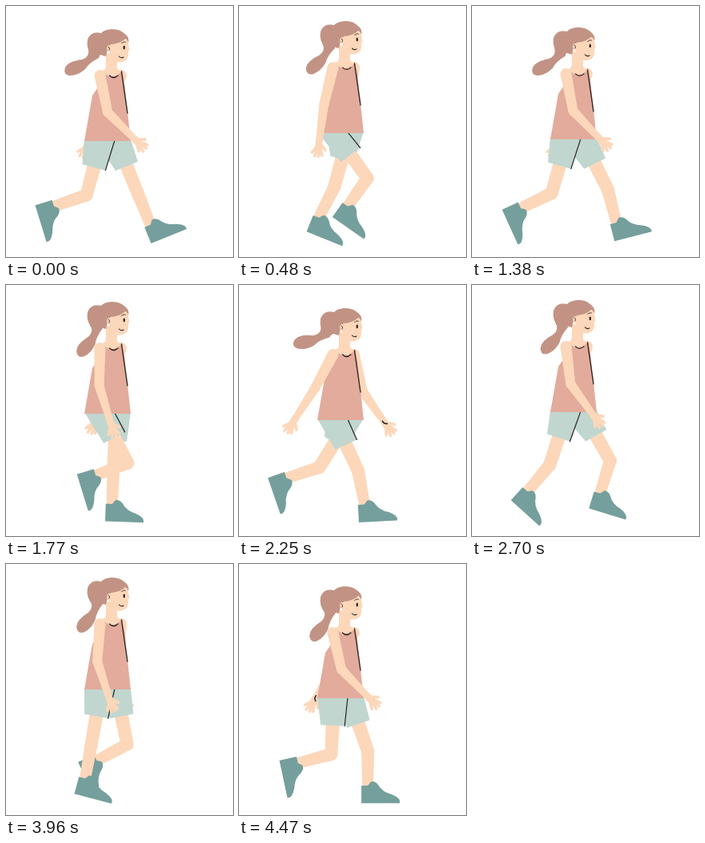
These frames come from a looping animation (284x314 px, 4500 ms). An HTML page with a canvas:

```html
<!DOCTYPE html>
<html lang="en">
<head>
<meta charset="utf-8">
<title>Walk cycle</title>
<style>
  html, body { margin: 0; width: 100%; height: 100%; overflow: hidden; background: #fff; }
  canvas { display: block; width: 284px; height: 314px; }
</style>
</head>
<body>
<canvas id="stage" width="284" height="314"></canvas>
<script>
const ctx = document.getElementById('stage').getContext('2d');
const LOOP = 4500, STEP = 30, STRIDE = 1440;
const SKIN = '#fcd7ba', HAIR = '#c29384', SHIRT = '#e2ab9c';
const SHORTS = '#c0d6cf', SHOE = '#759f9c', INK = '#26221f';
const THIGH = 71, CALF = 40, UPPER = 47, FORE = 46;

// Periodic monotone cubic through alternating time, value pairs.
function track(...pairs) {
  const n = pairs.length / 2;
  const time = i => pairs[2 * ((i + n) % n)] + STRIDE * Math.floor(i / n);
  const val = i => pairs[2 * ((i + n) % n) + 1];
  const slope = i => (val(i + 1) - val(i)) / (time(i + 1) - time(i));
  const tangent = i => {
    const a = slope(i - 1), b = slope(i);
    return a * b > 0 ? 2 * a * b / (a + b) : 0;
  };
  return t => {
    let i = 0;
    while (i < n - 1 && time(i + 1) <= t) i++;
    const h = time(i + 1) - time(i), u = (t - time(i)) / h, v = 1 - u;
    return val(i) * (1 + 2 * u) * v * v + tangent(i) * h * u * v * v
      + val(i + 1) * u * u * (3 - 2 * u) - tangent(i + 1) * h * u * u * v;
  };
}

// Angles are in degrees from straight down, forward is positive.
const bob = track(0, 0, 150, -1, 330, -8, 430, -11, 560, -7, 720, 0, 810, 0,
  990, -3, 1080, -12, 1150, -15, 1280, -9);
const tail = track(0, 0, 150, -25, 330, -25, 560, -12, 750, 11, 810, 12,
  990, -12, 1080, -25, 1200, -25);

const near = {
  hip: 119,
  thigh: track(0, -15, 40, -18, 150, -3, 330, 28, 460, 36, 600, 34, 720, 26,
    810, 25, 990, 20, 1080, -10, 1150, -15, 1260, -18),
  calf: track(0, -71, 150, -75, 330, -69, 480, -35, 600, 0, 705, 18, 750, 12,
    810, 11, 990, 4, 1080, -10, 1150, -20, 1260, -40),
  foot: track(0, 73, 150, 78, 330, 73, 480, 35, 600, 0, 705, -17, 750, -6,
    810, -3, 990, 0, 1080, 15, 1150, 25, 1260, 42),
  shoulder: [117.5, 87],
  upper: track(0, 12, 150, 13, 330, -1, 540, -18, 720, -28, 810, -28, 990, -24, 1080, -4, 1260, 7),
  fore: track(0, 45, 150, 44, 330, 17, 540, -16, 720, -34, 810, -33, 990, -27, 1080, 18, 1260, 36)
};
const far = {
  hip: 138,
  thigh: track(0, 22, 30, 21, 150, 19, 330, -3, 430, -12, 560, -20, 720, -29,
    810, -32, 990, -20, 1080, 11, 1200, 28, 1320, 30),
  calf: track(0, 22, 30, 12, 150, 0, 330, -2, 430, -16, 560, -45, 720, -68,
    810, -72, 990, -75, 1080, -62, 1200, -35, 1320, 0),
  foot: track(0, -22, 30, -8, 150, 0, 330, 2, 430, 14, 560, 36, 720, 67,
    810, 71, 990, 70, 1080, 65, 1200, 35, 1320, 0),
  shoulder: [144, 87],
  upper: track(0, -27, 150, -30, 330, -20, 540, -2, 720, 12, 810, 13, 990, 13, 1080, -3, 1260, -18),
  fore: track(0, -25, 150, -31, 330, -20, 540, 8, 720, 33, 810, 35, 990, 24, 1080, 8, 1260, -16)
};

const path = d => new Path2D(d);
const shape = {
  shoe: path('M-8 3 L-8 25 L40 25 Q42 19 30 14 Q18 11 13 2 Q9 -3 4 -2 L0 3 Z'),
  shirt: path('M122 80 Q133 92 145 80 L148 95 L156 169 H98 L108 112 Q119 98 122 80 Z'),
  neck: path('M125 58 L139 64 L139 78 Q141 81 145 81 Q134 95 121 82 Q126 79 125 70 Z'),
  face: path('M128 44 Q142 36 152 43 L154.5 54 L153 57 Q154 68 146 70 Q138 72 130 66 Z'),
  hair: path('M153 46 Q155 40 149 35 Q142 28 131 29 Q122 30 119 34 Q106 31 102 42 '
    + 'Q100 54 108 62 Q113 65 118 61 L125 63 Q127 52 131 48 Q143 47 149 41 Q152 42 153 46 Z'),
  tail: path('M103 54 Q105 64 95 67 Q78 69 74 77 Q71 86 80 87 Q90 87 99 79 Q104 71 116 65 L121 52 Z')
};

const rad = deg => deg * Math.PI / 180;
const tip = ([x, y], deg, len) => [x + len * Math.sin(rad(deg)), y + len * Math.cos(rad(deg))];

function fill(p, color) {
  ctx.fillStyle = color;
  ctx.fill(p);
}

function poly(points, color) {
  fill(path('M' + points.map(p => p.join(' ')).join('L') + 'Z'), color);
}

function line(d, width, color) {
  ctx.lineWidth = width;
  ctx.strokeStyle = color;
  ctx.stroke(path(d));
}

function dot(x, y, rx, ry, color) {
  ctx.beginPath();
  ctx.ellipse(x, y, rx, ry, 0, 0, 7);
  ctx.fillStyle = color;
  ctx.fill();
}

function placed([x, y], deg, draw) {
  ctx.save();
  ctx.translate(x, y);
  ctx.rotate(rad(deg));
  draw();
  ctx.restore();
}

// Tapered skin segment with rounded ends; returns its far end.
function limb(from, deg, len, r1, r2) {
  const to = tip(from, deg, len);
  poly([tip(from, deg + 90, r1), tip(to, deg + 90, r2),
    tip(to, deg - 90, r2), tip(from, deg - 90, r1)], SKIN);
  dot(...from, r1, r1, SKIN);
  dot(...to, r2, r2, SKIN);
  return to;
}

function arm(side, t, bracelet) {
  const elbow = limb(side.shoulder, side.upper(t), UPPER, 7, 6);
  const wrist = limb(elbow, side.fore(t), FORE, 6, 4.2);
  placed(wrist, -side.fore(t), () => {
    line('M0 2 L0 9', 9, SKIN);
    line('M-2 8 L-7 16 M-1 9 L-3 20 M1 9 L2 20 M2 8 L6 18 M2 4 L9 11', 3.6, SKIN);
    if (bracelet) line('M-1 -1 Q-2 3 2 5', 1.5, INK);
  });
}

function leg(side, t, y) {
  const knee = limb([side.hip, y], side.thigh(t), THIGH, 9, 8);
  const ankle = limb(knee, side.calf(t), CALF, 8, 7);
  placed(ankle, side.foot(t), () => fill(shape.shoe, SHOE));
}

function shortsLeg(side, t, y, left, right) {
  const a = side.thigh(t), hem = tip([side.hip, y], a, 35);
  const front = tip(hem, a + 90, 15), back = tip(hem, a - 90, 15);
  poly([[left, y - 1], [right, y - 1], front, back], SHORTS);
  return front;
}

function head(t) {
  placed([112, 52], tail(t), () => {
    ctx.translate(-112, -52);
    fill(shape.tail, HAIR);
  });
  fill(shape.neck, SKIN);
  fill(shape.face, SKIN);
  fill(shape.hair, HAIR);
  dot(129, 53, 2.8, 4, SKIN);
  line('M128 51 Q130.5 52 129 55', 0.9, INK);
  dot(147.8, 52, 1.2, 2.4, INK);
  line('M144.5 46.5 Q147 44 149.5 45', 0.8, INK);
  line('M141.5 63 Q144 66 147 64', 1.1, INK);
}

function draw(t) {
  const dy = bob(t), hipY = 168 + dy;
  const bodySpace = fn => placed([0, dy], 0, fn);
  ctx.clearRect(0, 0, 284, 314);
  ctx.lineCap = ctx.lineJoin = 'round';

  bodySpace(() => arm(far, t, true));
  leg(far, t, hipY);
  shortsLeg(far, t, hipY, 110, 156);
  leg(near, t, hipY);
  const seam = shortsLeg(near, t, hipY, 98, 136);
  line(`M136 ${hipY} L${seam.join(' ')}`, 1.2, INK);

  bodySpace(() => {
    fill(shape.shirt, SHIRT);
    head(t);
    line('M129.5 87 Q134.5 92 140 87', 1.2, INK);
    line('M144.5 82 L152 134', 1.3, INK);
    arm(near, t, false);
  });
}

// The opening pose holds for two steps.
function tick(now) {
  const step = Math.floor(now % LOOP / STEP);
  draw(step < 2 ? 0 : step * STEP % STRIDE);
  requestAnimationFrame(tick);
}
draw(0);
requestAnimationFrame(tick);
</script>
</body>
</html>
```
